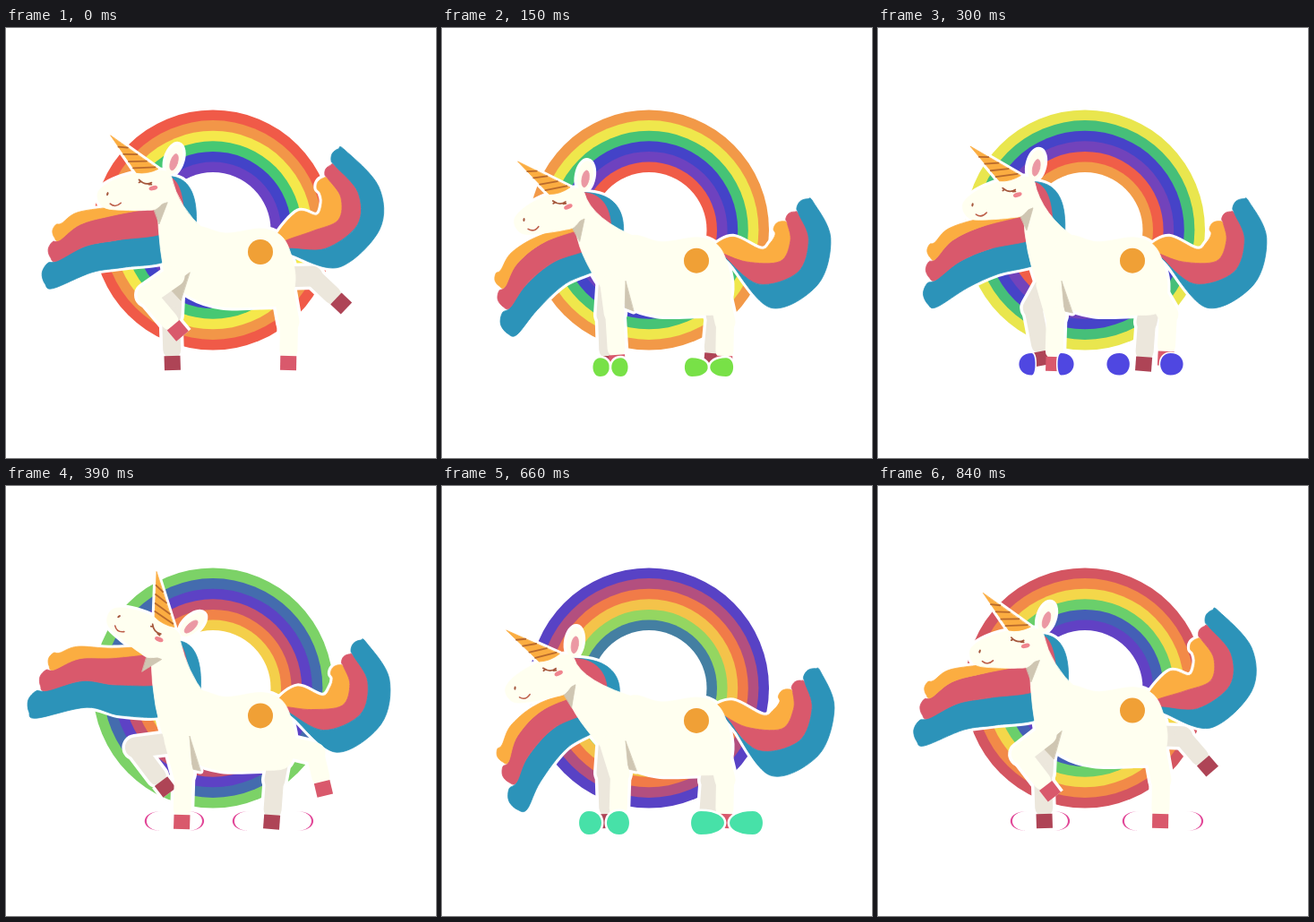
An HTML page with a canvas for the animation above (870 ms loop, 480x480 px).

```html
<!DOCTYPE html>
<html lang="en">
<head>
<meta charset="utf-8">
<title>Walking unicorn</title>
<style>
html, body { margin: 0; width: 100%; height: 100%; overflow: hidden; background: #fff; }
canvas { display: block; }
</style>
</head>
<body>
<canvas id="stage" width="480" height="480"></canvas>
<script>
const ctx = document.getElementById('stage').getContext('2d');
const LOOP = 870, STEP = 30, TAU = 2 * Math.PI;
const CREAM = '#fffff0', BEIGE = '#ece7dc', SHADE = '#cfc6b2';
const PINK = '#d9596c', BLUE = '#2c93b9', ORANGE = '#fbad41', DARK = '#ae4456', BROWN = '#a5573c';
const RAINBOW = [[240, 90, 72], [242, 150, 72], [245, 232, 75], [70, 200, 115], [67, 67, 200], [105, 65, 195]];

// Turning points of the nod: time, height from 0 (low) to 1 (high).
const NOD = [[-20, .75], [210, .13], [395, 1], [655, 0], [850, .75], [1080, .13]];

// Edges of hair run from root to tip; each strand lies between two cuts [at root, at tip].
const MANE = {
  low: [180, 268, 140, 292, 110, 330, 95, 361, 165, 225, 110, 242, 78, 266, 67, 289],
  high: [180, 255, 128, 256, 90, 247, 34, 259, 180, 178, 120, 181, 80, 179, 60, 186],
  cuts: [[0, 0], [.47, .42], [.92, .74], [1, 1]], colors: [BLUE, PINK, ORANGE]
};
const TAIL = {
  high: [303, 230, 326, 205, 347, 209, 353, 195, 351, 184, 322, 254, 372, 267, 417, 225, 416, 177, 378, 136],
  low: [303, 247, 325, 240, 358, 256, 370, 250, 377, 241, 322, 264, 366, 323, 420, 301, 438, 248, 423, 208],
  cuts: [[0, 0], [.36, .32], [.68, .62], [1, 1]], colors: [ORANGE, PINK, BLUE]
};

// Knee and toe, standing and fully raised; "peak" is the time of the raise.
const LEGS = {
  farFront: { hip: [186, 280], stand: [184, 320, 186, 382], raised: [139, 288, 182, 334], peak: 435, color: BEIGE, hoof: DARK },
  farBack: { hip: [308, 278], stand: [300, 328, 296, 383], raised: [342, 277, 380, 313], peak: 0, color: BEIGE, hoof: DARK },
  nearBack: { hip: [308, 283], stand: [316, 328, 315, 382], raised: [349, 294, 365, 338], peak: 435, color: CREAM, hoof: PINK },
  nearFront: { hip: [188, 277], stand: [198, 321, 196, 383], raised: [158, 298, 197, 344], peak: 0, color: CREAM, hoof: PINK }
};

const mix = (a, b, u) => a + (b - a) * u;
const blend = (a, b, u) => a.map((v, i) => mix(v, b[i], u));
const clamp = u => Math.max(0, Math.min(1, u));
const pairs = flat => flat.flatMap((v, i) => i % 2 ? [] : [[v, flat[i + 1]]]);

function nodAt(t) {
  const i = NOD.findLastIndex(([time]) => time <= t);
  const [[t0, a], [t1, b]] = [NOD[i], NOD[i + 1]];
  return mix(a, b, (1 - Math.cos(Math.PI * (t - t0) / (t1 - t0))) / 2);
}

// Two steps per loop; the second one springs only half as high.
function dropAt(t) {
  const a = TAU * t / LOOP;
  return 1 - (1 + Math.cos(2 * a)) / 2 * (.75 + .25 * Math.cos(a));
}

function raiseAt(t, peak) {
  const gap = Math.abs((t - peak + LOOP * 1.5) % LOOP - LOOP / 2);
  return Math.cos(Math.PI / 2 * clamp(gap / 200)) ** 2;
}

function smooth(points) {
  const path = new Path2D(), n = points.length, at = i => points[(i + n) % n];
  path.moveTo(...points[0]);
  for (let i = 0; i < n; i++) {
    const [a, b, c, d] = [at(i - 1), at(i), at(i + 1), at(i + 2)];
    path.bezierCurveTo(b[0] + (c[0] - a[0]) / 6, b[1] + (c[1] - a[1]) / 6,
      c[0] - (d[0] - b[0]) / 6, c[1] - (d[1] - b[1]) / 6, ...c);
  }
  return path;
}

function oval(x, y, rx, ry, turn = 0) {
  const path = new Path2D();
  path.ellipse(x, y, rx, ry, turn, 0, TAU);
  return path;
}

const part = (path, color, width = 0, cap = 'round') => ({ path, color, width, cap });

function strands({ low, high, cuts, colors }, height) {
  const points = pairs(blend(low, high, height)), n = points.length / 2;
  const edge = ([root, tip]) => points.slice(0, n).map((p, i) =>
    blend(p, points[n + i], mix(root, tip, i / (n - 1))));
  return colors.map((color, k) => {
    const a = edge(cuts[k]), b = edge(cuts[k + 1]), [p, q] = [a[n - 1], b[n - 1]];
    const dx = q[0] - p[0], dy = q[1] - p[1];
    const cap = [[.12, .32], [.5, .48], [.88, .32]].map(([u, v]) =>
      [p[0] + u * dx + v * dy, p[1] + u * dy - v * dx]);
    return part(smooth([...a, ...cap, ...b.reverse()]), color);
  });
}

function leg({ hip, stand, raised, peak, color, hoof }, t, bob) {
  const raise = raiseAt(t, peak);
  const [kx, ky] = blend(stand, raised, raise);
  const [, , tx, ty] = blend(stand, raised, raise ** 1.5);
  const u = 1 - 16 / Math.hypot(tx - kx, ty - ky), ax = mix(kx, tx, u), ay = mix(ky, ty, u);
  return [
    part(new Path2D(`M${hip[0]} ${hip[1] + bob}L${kx} ${ky}`), color, 23),
    part(new Path2D(`M${kx} ${ky}L${mix(kx, ax, .85)} ${mix(ky, ay, .85)}`), color, 20),
    part(new Path2D(`M${ax} ${ay}L${tx} ${ty}`), hoof, 18, 'butt')
  ];
}

// The head is drawn around the eye.
const skull = smooth(pairs([26, -10, 5, -12, -20, -7, -40, 1, -52, 11, -52, 22, -44, 30, -25, 32, 0, 32, 14, 29, 29, 10]));
const horn = new Path2D('M-39-51L-10-10Q2-8 14-14Z');
const chinShade = new Path2D('M9 28L25 23L16 47Z');

function drawRings(t) {
  const shift = t / LOOP * 6;
  for (let band = 0; band < 6; band++) {
    const k = Math.floor(shift + band);
    const rgb = blend(RAINBOW[k % 6], RAINBOW[(k + 1) % 6], shift % 1).map(Math.round);
    ctx.fillStyle = `rgb(${rgb})`;
    ctx.fill(oval(231, 225.5, 134 - band * 11.6, 134 - band * 11.6));
  }
  ctx.fillStyle = '#fff';
  ctx.fill(oval(231, 225.5, 64.5, 64.5));
}

function drawFace(matrix) {
  const line = (d, color, width) => {
    ctx.strokeStyle = color;
    ctx.lineWidth = width;
    ctx.stroke(new Path2D(d));
  };
  ctx.save();
  ctx.transform(matrix.a, matrix.b, matrix.c, matrix.d, matrix.e, matrix.f);
  ctx.lineCap = 'round';
  line('M-7-2Q0 5 7 1M-5 0l-2 1M4 3l3 0', BROWN, 1.7);
  line('M-39 25Q-33 30-27 24', '#bd5f4a', 1.6);
  ctx.fillStyle = '#f0858f';
  ctx.fill(oval(9, 7, 5, 2.5, -.25));
  ctx.fillStyle = BROWN;
  ctx.fill(oval(-42, 14, 1.1, 2.1, .3));
  for (const u of [.3, .5, .7, .88])
    line(`M${mix(-39, -10, u)} ${mix(-51, -10, u)}L${mix(-39, 14, u + .06)} ${mix(-51, -14, u + .06)}`, '#b96a2c', 1.8);
  ctx.restore();
}

function drawUnicorn(t) {
  const nod = nodAt(t), drop = dropAt(t), bob = 12 * drop;
  const ex = 120 + 48 * nod, ey = 204 - 44 * nod, turn = -11 + 11 * nod + 38 * nod ** 8;
  const matrix = new DOMMatrix().translate(ex, ey).rotate(turn);
  const earMatrix = new DOMMatrix().translate(ex, ey).rotate(turn * .8);
  const place = (path, m = matrix) => {
    const placed = new Path2D();
    placed.addPath(path, m);
    return placed;
  };
  const nape = matrix.transformPoint(new DOMPoint(29, -6));
  const jaw = matrix.transformPoint(new DOMPoint(14, 28));
  const limb = name => leg(LEGS[name], t, bob);

  const crest = (w, y) => new Path2D(`M${nape.x - 8} ${nape.y}
    C${w - 5} ${nape.y - 3} ${w + 2} ${nape.y + 25} ${w} ${222 + bob}L${w - 30} ${y}Z`);
  const crestX = 150 + .4 * ex;
  const neck = new Path2D(`M${nape.x} ${nape.y}
    Q${nape.x + 8} ${mix(nape.y, 224 + bob, .6)} 222 ${226 + bob}L235 ${270 + bob}L180 ${288 + bob / 2}
    Q${jaw.x + 1} 250 ${jaw.x} ${jaw.y}Z`);
  const body = smooth(pairs([212, 222, 245, 229, 285, 224, 307, 232, 318, 252, 323, 282, 314, 307,
    285, 311, 240, 311, 206, 300, 182, 278, 190, 245]).map(([x, y]) => [x, y + bob]));
  const fold = 1 - raiseAt(t, LEGS.nearFront.peak);
  const shade = new Path2D(`M205 ${273 + bob}L${182 + 26 * fold} ${290 + 26 * fold}L${195 + 22 * fold} ${304 + 14 * fold}Z`);

  const parts = [
    part(crest(crestX, 220), BLUE),
    part(crest(crestX - 14, 205), PINK),
    ...strands(MANE, .75 * nod + .25 * nod * nod),
    ...strands(TAIL, 1 - drop),
    ...limb('farFront'),
    ...limb('farBack'),
    part(neck, CREAM),
    part(body, CREAM),
    part(place(chinShade), SHADE),
    part(shade, SHADE),
    ...limb('nearBack'),
    ...limb('nearFront'),
    part(place(skull), CREAM),
    part(place(horn), ORANGE),
    part(place(oval(32, -25, 8.5, 17, .3), earMatrix), CREAM),
    part(place(oval(32, -22, 4, 9.5, .3), earMatrix), '#eb98a3')
  ];
  ctx.lineJoin = 'round';
  ctx.strokeStyle = '#fff';
  for (const { path, width, cap } of parts) {
    ctx.lineCap = cap;
    ctx.lineWidth = width + 7;
    ctx.stroke(path);
  }
  for (const { path, color, width, cap } of parts) {
    ctx.lineCap = cap;
    ctx.fillStyle = ctx.strokeStyle = color;
    ctx.lineWidth = width || .8;
    ctx.stroke(path);
    if (!width) ctx.fill(path);
  }
  drawFace(matrix);
  ctx.fillStyle = '#f0a036';
  ctx.fill(oval(284, 250 + bob, 14, 14));
}

// A puff splits into two lobes that thin out to crescents.
function drawPuff(cx, p, wide) {
  const grow = clamp(p / .35), thin = clamp((p - .5) / .42);
  const bottom = 389 - 4 * thin, top = 377 - 14 * grow;
  const depth = 3 + 8 * grow + 8 * thin;
  ctx.lineWidth = 5 * (1 - thin);
  ctx.strokeStyle = '#fff';
  ctx.fillStyle = `hsl(${30 + 322 * p} 72% 58%)`;
  for (const side of [-1, 1]) {
    const x = cx + side * (6 + 18 * grow + 10 * p + wide * grow - depth);
    const out = x + side * depth * 1.33;
    const back = x - side * 1.33 * mix(4 + 10 * grow + wide * grow, 2.2 - depth, thin);
    const lobe = new Path2D(`M${x} ${top}C${out} ${top} ${out} ${bottom} ${x} ${bottom}
      C${back} ${bottom} ${back} ${top} ${x} ${top}Z`);
    if (thin < 1) ctx.stroke(lobe);
    ctx.fill(lobe);
  }
}

function draw(now) {
  const t = Math.floor(now % LOOP / STEP) * STEP;
  ctx.fillStyle = '#fff';
  ctx.fillRect(0, 0, 480, 480);
  drawRings(t);
  drawUnicorn(t);
  for (const [start, front, back] of [[75, 188, 298], [525, 181, 318]]) {
    const p = (t - start) / 340;
    if (p > 0 && p < 1) {
      drawPuff(front, p, 0);
      drawPuff(back, p, 12);
    }
  }
}

const begin = performance.now();
function tick() {
  draw(performance.now() - begin);
  requestAnimationFrame(tick);
}
tick();
</script>
</body>
</html>
```
